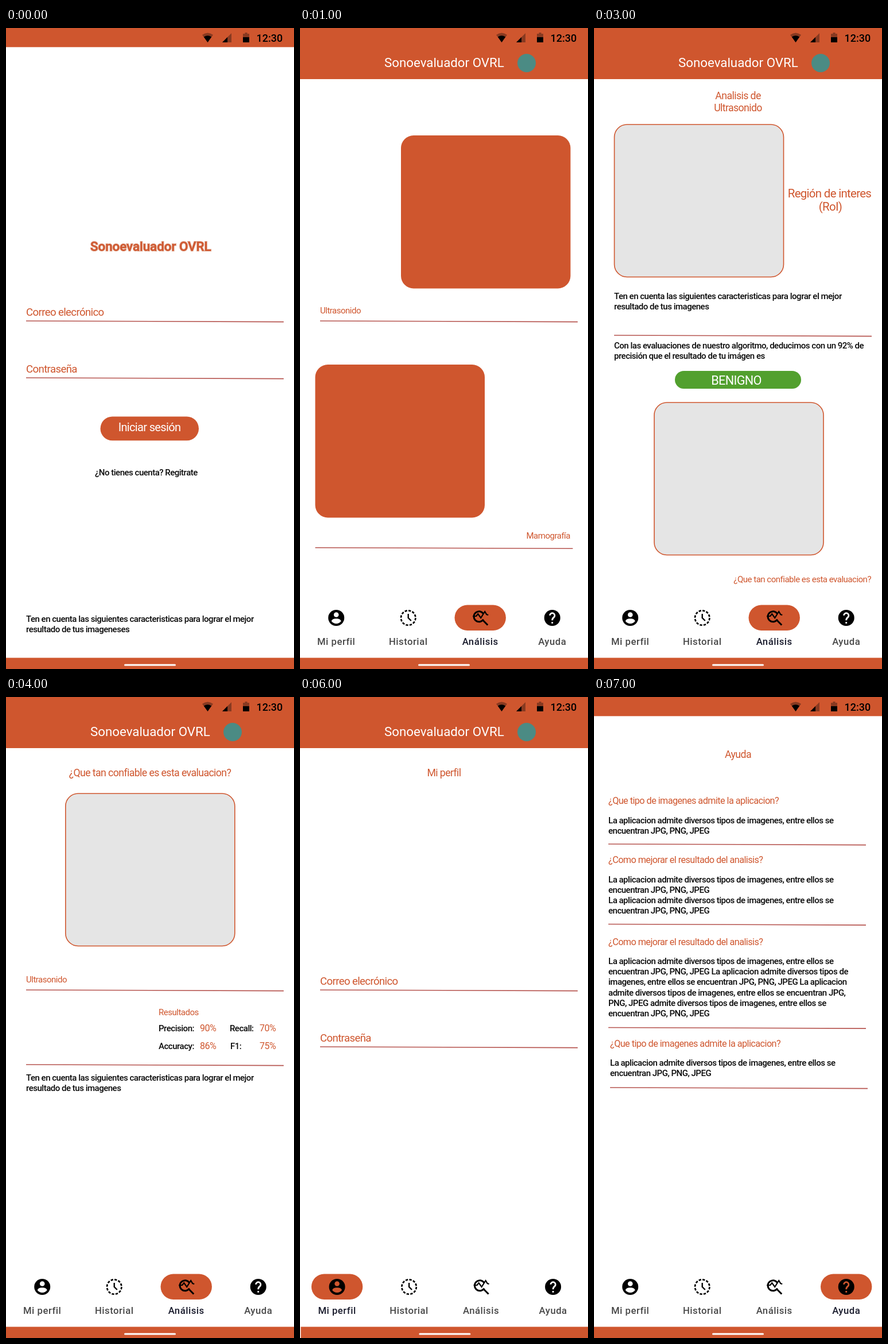
An HTML page for the animation above (8000 ms loop, 502 by 1116 pixels).

```html
<!DOCTYPE html>
<html lang="es">
<head>
<meta charset="utf-8">
<style>
  html, body { margin: 0; width: 100%; height: 100%; overflow: hidden; background: #fff; }
  svg { display: block; width: 502px; height: 1116px; font-family: Roboto, sans-serif; }
  .copy { letter-spacing: -.033em; }
  .nav { font-size: 16.7px; font-weight: 500; letter-spacing: .5px; }
</style>
</head>
<body>
<svg id="stage" viewBox="0 0 502 1116"></svg>
<script>
const ORANGE = '#cf562e', GREY = '#e5e5e5', BLACK = '#090909';
const APP = 'Sonoevaluador OVRL';
const SCREEN_MS = 1000;

const text = (x, y, str, { size = 15, fill = ORANGE, anchor = 'start', weight = 400 } = {}) =>
  `<text class="copy" x="${x}" y="${y}" font-size="${size}" fill="${fill}" text-anchor="${anchor}" font-weight="${weight}">${str}</text>`;
const body = (x, y, ...lines) =>
  lines.map((line, i) => text(x, y + i * 18.2, line, { fill: BLACK, weight: 500 })).join('');
const title = (y, str) => text(251, y, str, { size: 17.7, anchor: 'middle' });
const box = (x, y, w, h, r, fill = ORANGE, stroke = 'none') =>
  `<rect x="${x}" y="${y}" width="${w}" height="${h}" rx="${r}" fill="${fill}" stroke="${stroke}" stroke-width="1.6"/>`;
const frame = (x, y) => box(x, y, 295, 265.5, 22, GREY, ORANGE);
const rule = (x, y) =>
  `<path d="M${x} ${y}l449 1.6" stroke="#b65550" stroke-width="1.6"/>`;

const statusBar = box(0, 0, 502, 33.3, 0) + `
  <path d="M342 12Q351.500 5 361 12L351.500 25Z" fill="#883a21"/>
  <path d="M344.800 15.500Q351.500 11 358.200 15.500L351.500 25Z"/>
  <path d="M393 9V25H377Z" fill="#883a21"/><path d="M386 16V25H377Z"/>
  <path d="M413 10h3.500v-2h4v2h3.500v15h-11Z" fill="#883a21"/><path d="M413 16h11v9h-11Z"/>
  <text x="436.500" y="23.500" font-size="18" font-weight="500">12:30</text>`;

const homeBar = dx => box(dx, 1096.5, 502, 20, 0) + box(206 + dx, 1107.5, 90, 3, 1.5, '#fff');

const header = box(0, 33, 502, 56, 0) +
  `<text x="147" y="68" font-size="22.300" fill="#fff">${APP}</text>
   <circle cx="395" cy="61" r="16" fill="#4b8b84"/>`;

// Icons are centred on 0,0; "hole" is the colour behind them.
const icons = [
  hole => `<circle r="14"/><circle cy="-5.500" r="4.300" fill="${hole}"/>
    <path d="M-8.500 5.600Q-7 1.300 0 1.300T8.500 5.600Q5.500 10 0 10T-8.500 5.600Z" fill="${hole}"/>`,
  () => `<circle r="12.700" fill="none" stroke="#000" stroke-width="2.700" stroke-dasharray="4.300 2.350"/>
    <path d="M0-7V0L5 5" fill="none" stroke="#000" stroke-width="2.400"/>`,
  () => `<path d="M5.500-7A9 9 0 1 0 5.500 2.500M3.500 3L13 12.500" fill="none" stroke="#000" stroke-width="3"/>
    <path d="M-13-3H-7L-4-7L1 0L8-11L11-6L14-5" fill="none" stroke="#000" stroke-width="2.200"/>`,
  hole => `<circle r="14"/><path d="M-4.200-4.200A4.200 4.200 0 1 1 2.800-1Q0 1 0 4.200" fill="none" stroke="${hole}" stroke-width="2.800"/>
    <path d="M-1.400 7h2.800v2.800h-2.800Z" fill="${hole}"/>`
];

const navBar = (active, dx) =>
  ['Mi perfil', 'Historial', 'Análisis', 'Ayuda'].map((label, i) => {
    const on = i === active, x = 63.2 + i * 125.5 + dx;
    return (on ? box(x - 44.7, 1004.5, 89.4, 44.5, 22.2) : '') +
      `<g transform="translate(${x} 1027)">${icons[i](on ? ORANGE : '#fff')}</g>
       <text class="nav" x="${x}" y="1074" text-anchor="middle" fill="${on ? '#191b2c' : '#484848'}">${label}</text>`;
  }).join('');

const page = (content, { nav = -1, dx = 0, head = true } = {}) =>
  statusBar + (head ? header : '') + content + (nav < 0 ? '' : navBar(nav, dx)) + homeBar(dx);

const hint = 'Ten en cuenta las siguientes caracteristicas para lograr el mejor';

const field = (y, label) => text(35, y, label, { size: 18.6 }) + rule(35, y + 9);

const login =
  `<text x="147" y="388" font-size="22.300" fill="${ORANGE}" stroke="#dfa58d" stroke-width="2" paint-order="stroke" font-weight="500">${APP}</text>` +
  field(501, 'Correo elecrónico') + field(600, 'Contraseña') +
  box(164.5, 676.5, 171.5, 41.8, 20.9) +
  text(250, 702, 'Iniciar sesión', { size: 20, fill: '#fff', anchor: 'middle' }) +
  body(155, 779, '¿No tienes cuenta? Regitrate') +
  body(35, 1034, hint, 'resultado de tus imageneses');

const choose =
  box(176, 187, 295.5, 266.5, 22) + text(35, 497, 'Ultrasonido') + rule(35, 510) +
  box(26.5, 586, 295.5, 266.5, 22) + text(471, 889, 'Mamografía', { anchor: 'end' }) + rule(26.5, 904.7);

const upload =
  frame(103.8, 168) + `<circle cx="251.500" cy="300.500" r="35.500" fill="${ORANGE}"/>
  <path d="M233.500 300.500h36m-18-18v36" stroke="${GREY}" stroke-width="6.500"/>` +
  text(35, 497, 'Cargar imagen') + rule(35, 510) +
  body(35, 554, hint, 'resultado de tus imagenes');

const analysis =
  title(124, 'Analisis de') + title(145, 'Ultrasonido') + frame(35.5, 168) +
  text(410.5, 295, 'Región de interes', { size: 20.4, anchor: 'middle' }) +
  text(412, 318, '(RoI)', { size: 20.4, anchor: 'middle' }) +
  body(35, 472, hint, 'resultado de tus imagenes') + rule(35, 535) +
  body(35, 558, 'Con las evaluaciones de nuestro algoritmo, deducimos con un 92% de',
    'precisión que el resultado de tu imágen es') +
  box(141, 597, 220, 31, 15.5, '#52a02e') +
  text(248, 620.5, 'BENIGNO', { size: 21.7, fill: '#fff', anchor: 'middle' }) +
  frame(105, 652) +
  text(483, 965, '¿Que tan confiable es esta evaluacion?', { anchor: 'end' });

const metrics = y =>
  text(266, y, 'Resultados') +
  [[266, 28, 'Precision:', 338, '90%'], [390, 28, 'Recall:', 442, '70%'],
   [266, 59, 'Accuracy:', 338, '86%'], [391, 59, 'F1:', 442, '75%']]
    .map(([x, dy, label, vx, value]) => body(x, y + dy, label) + text(vx, y + dy, value, { size: 16 })).join('');

const reliability =
  title(138, '¿Que tan confiable es esta evaluacion?') +
  frame(103.8, 168) + text(35, 497, 'Ultrasonido') + rule(35, 510) + metrics(554) + rule(35, 640) +
  body(35, 668, hint, 'resultado de tus imagenes');

const entry = (y, kind, date) =>
  [35.5, 146.8].map(x => box(x, y, 87.3, 79, 20, '#e5e6e8', ORANGE)).join('') +
  metrics(y + 16.5) + text(35, y + 103, kind) +
  text(480, y + 103, date, { fill: BLACK, anchor: 'end', size: 14, weight: 500 }) + rule(35, y + 116);

const history =
  title(138, 'Historial de análisis previos') +
  entry(195.5, 'Ultrasonido', '03/05/2023') +
  entry(373, 'Ultrasonido', '02/05/2023') +
  entry(552.5, 'Mamografia', '01/05/2023') +
  body(49, 945, hint, 'resultado de tus imageneses');

const profile = title(138, 'Mi perfil') + field(501, 'Correo elecrónico') + field(600, 'Contraseña');

const admits = ['La aplicacion admite diversos tipos de imagenes, entre ellos se', 'encuentran JPG, PNG, JPEG'];
const question = (x, y, ask, ruleY, ...lines) =>
  text(x, y, ask, { size: 16.2 }) + body(x, y + 33.5, ...lines) + rule(x, ruleY);

const help =
  title(106, 'Ayuda') +
  question(25, 186, '¿Que tipo de imagenes admite la aplicacion?', 256, ...admits) +
  question(25, 289, '¿Como mejorar el resultado del analisis?', 395.5, ...admits, ...admits) +
  question(25, 431.5, '¿Como mejorar el resultado del analisis?', 575.5, admits[0],
    'encuentran JPG, PNG, JPEG La aplicacion admite diversos tipos de',
    'imagenes, entre ellos se encuentran JPG, PNG, JPEG La aplicacion',
    'admite diversos tipos de imagenes, entre ellos se encuentran JPG,',
    'PNG, JPEG admite diversos tipos de imagenes, entre ellos se',
    'encuentran JPG, PNG, JPEG') +
  question(28, 608.5, '¿Que tipo de imagenes admite la aplicacion?', 680, ...admits);

const screens = [
  page(login, { head: false }),
  page(choose, { nav: 2 }),
  page(upload, { nav: 2 }),
  page(analysis, { nav: 2 }),
  page(reliability, { nav: 2 }),
  page(history, { nav: 1, dx: 1.4 }),
  page(profile, { nav: 0, dx: 1.4 }),
  page(help, { nav: 3, head: false })
];

const stage = document.getElementById('stage');
const start = performance.now();
let shown = -1;

function draw(now) {
  const index = Math.floor(Math.max(0, now - start) / SCREEN_MS) % screens.length;
  if (index !== shown) stage.innerHTML = screens[shown = index];
  requestAnimationFrame(draw);
}
draw(start);
</script>
</body>
</html>
```
